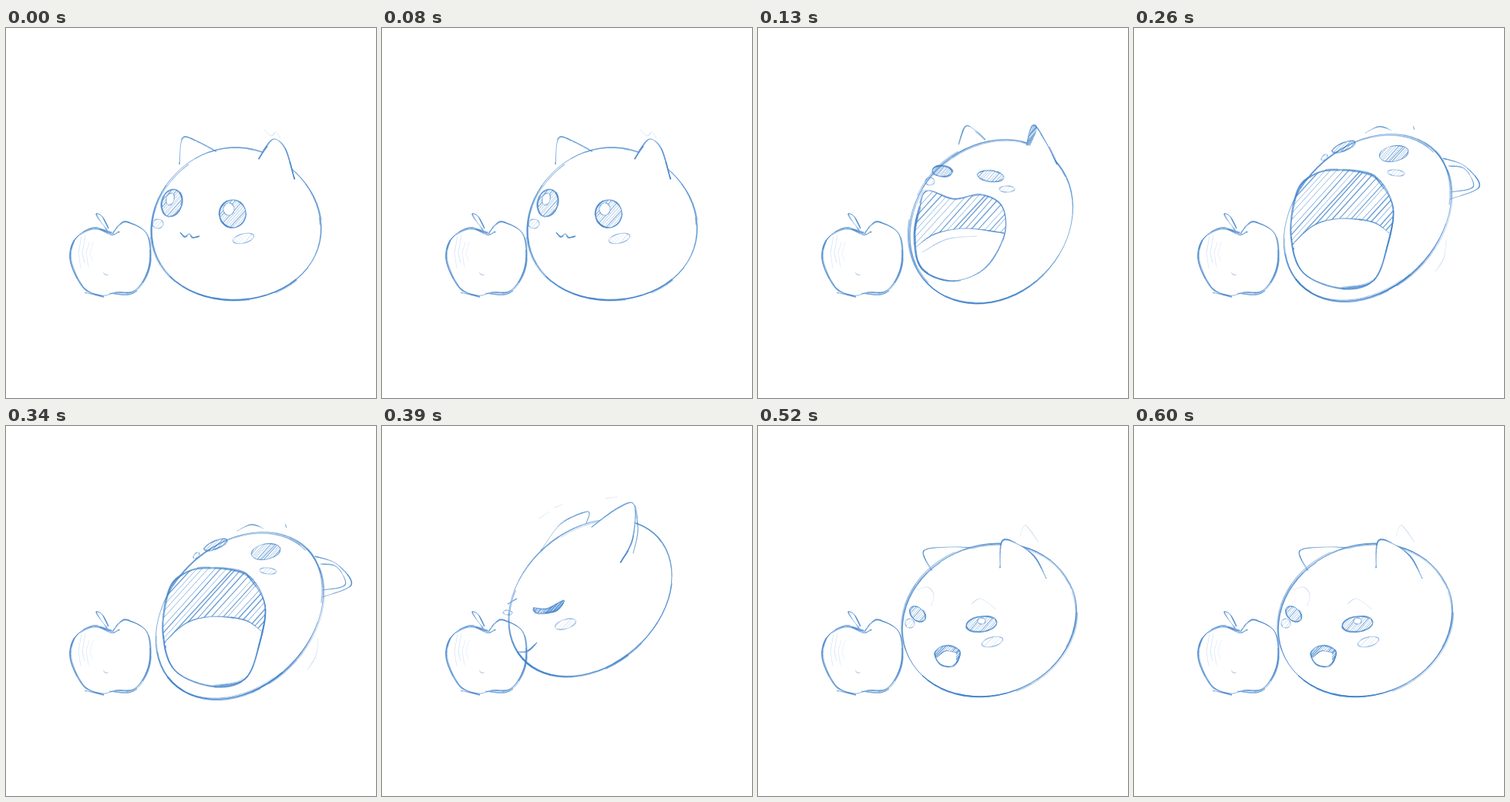
An HTML page with a canvas for the animation above (650 ms loop, 480x480 px).

```html
<!DOCTYPE html>
<html>
<head>
<meta charset="utf-8">
<style>
html, body { margin: 0; width: 100%; height: 100%; overflow: hidden; background: #fff }
canvas { display: block }
</style>
</head>
<body>
<canvas id="stage" width="480" height="480"></canvas>
<script>
const ctx = document.getElementById('stage').getContext('2d');
const STEP = 130;
let seed;
const random = () => (seed = seed * 16807 % 2147483647) / 2147483647;
const spread = r => (random() * 2 - 1) * r;

// Smooth curve through "x,y x,y ..."; a trailing z closes it.
function line(text) {
  const closed = text.endsWith('z');
  const keys = text.replace('z', '').split(' ').map(p => p.split(',').map(Number));
  const n = keys.length, last = closed ? n : n - 1, pts = [];
  const at = i => keys[closed ? (i + n) % n : Math.max(0, Math.min(n - 1, i))];
  for (let i = 0; i < last; i++) {
    const [a, b, c, d] = [i - 1, i, i + 1, i + 2].map(at);
    for (let t = 0; t < 1; t += .125)
      pts.push([0, 1].map(k => b[k] + .5 * t * (c[k] - a[k] +
        t * (2 * a[k] - 5 * b[k] + 4 * c[k] - d[k] + t * (3 * (b[k] - c[k]) + d[k] - a[k])))));
  }
  return [...pts, at(last)];
}

// Tilted oval; taper widens its lower half.
function egg(cx, cy, rx, ry, tilt = 0, taper = 0) {
  const cos = Math.cos(tilt), sin = Math.sin(tilt);
  return Array.from({ length: 65 }, (_, i) => {
    const a = i * Math.PI / 32, y = ry * Math.sin(a);
    const x = rx * Math.cos(a) * (1 + taper * Math.sin(a));
    return [cx + x * cos - y * sin, cy + x * sin + y * cos];
  });
}

// One line whose pressure varies along its length.
function pencil(pts, width, alpha) {
  const phase = random() * 6;
  ctx.globalAlpha = alpha;
  for (let i = 1; i < pts.length; i++) {
    ctx.lineWidth = width * (.85 + .3 * Math.sin(i * .4 + phase));
    ctx.beginPath();
    ctx.moveTo(...pts[i - 1]);
    ctx.lineTo(...pts[i]);
    ctx.stroke();
  }
}

// A main line with short, loose strands laid over it.
function sketch(pts, width = 1.5, loose = .9) {
  pencil(pts, width, .75);
  for (let n = pts.length / 6; n > 0; n--) {
    const count = 5 + random() * pts.length * .25;
    const start = Math.floor(random() * (pts.length + count) - count);
    const dx = spread(loose), dy = spread(loose);
    pencil(pts.slice(Math.max(0, start), Math.max(0, start + count)).map(([x, y]) => [x + dx, y + dy]), width * .75, .5);
  }
}

const faint = text => pencil(line(text), 1, .25);

function trace(pts) {
  ctx.beginPath();
  pts.forEach(p => ctx.lineTo(...p));
}

function erase(pts) {
  ctx.globalAlpha = 1;
  trace(pts);
  ctx.fill();
}

function hatch(pts, gap, width = 1.3, alpha = .75) {
  const xs = pts.map(p => p[0]), ys = pts.map(p => p[1]);
  const top = Math.min(...ys), bottom = Math.max(...ys), run = (bottom - top) * .9;
  ctx.save();
  trace(pts);
  ctx.clip();
  for (let x = Math.min(...xs); x < Math.max(...xs) + run; x += gap)
    pencil([[x + spread(gap / 4), top], [x - run + spread(gap / 4), bottom]], width, alpha);
  ctx.restore();
}

function body(...shape) {
  const pts = egg(...shape);
  const low = pts.reduce((best, p, i) => p[1] > pts[best][1] ? i : best, 0);
  sketch(pts, 1.5, 1.8);
  sketch(pts.slice(Math.max(0, low - 8), low + 9), 1.7, 1.2);
}

function eye(shape, gap = 3, width = 1.5) {
  const pts = egg(...shape);
  hatch(pts, gap, 1.1, .6);
  sketch(pts, width);
}

function shine(...shape) {
  const pts = egg(...shape);
  erase(pts);
  pencil(pts, 1.1, .8);
}

function cheek(...shape) {
  const pts = egg(...shape);
  hatch(pts, 5, .8, .3);
  pencil(pts, 1.1, .65);
}

function mouth(outline, tongue, gap) {
  const rim = line(outline), edge = line(tongue);
  const bottom = Math.max(...rim.map(p => p[1]));
  hatch(rim, gap);
  erase([...edge, [edge.at(-1)[0], bottom], [edge[0][0], bottom]]);
  sketch(edge, 1.2, .6);
  sketch(rim, 1.6, 1.2);
}

function frontEar(text) {
  const pts = line(text);
  erase(pts);
  sketch(pts, 1.6);
}

function apple() {
  sketch(line('137,266 112,260 89,275 84,303 101,337 124,347 143,343 168,340 186,308 183,268 158,252 147,256 138,267'), 1.4, 1.3);
  sketch(line('122,261 137,268 147,264'));
  sketch(line('133,260 125,245 117,241 122,250 131,262'), 1.3, .4);
  sketch(line('102,343 127,349'), 1.3);
  sketch(line('134,344 158,346 170,341'), 1.3);
  pencil(line('126,317 129,320 133,320'), 1, .5);
  for (let x = 94; x < 114; x += 5) pencil([[x + 4, 272 + spread(6)], [x, 292], [x + 3, 308 + spread(8)]], 1, .2);
}

function sitting() {
  body(298, 254, 110, 99, -.06, .08);
  sketch(line('225,177 229,143 248,147 273,160'), 1.3);
  frontEar('328,170 338,153 349,144 363,158 374,196');
  sketch(line('328,170 339,153'), 1.8);
  eye([215, 227, 13, 18, .25], 3.5, 1.7);
  eye([294, 241, 17, 18], 3.5, 1.7);
  shine(213, 222, 5, 8, .3);
  shine(289, 235, 7, 8);
  sketch(line('226,265 232,271 238,267 242,272 251,270'), 1.9, .5);
  cheek(308, 273, 14, 6, -.25);
  cheek(197, 254, 7, 6);
  faint('335,132 344,140 350,135 356,143');
}

function opening() {
  mouth('220,211 254,222 290,216 317,232 319,270 294,312 252,328 212,312 203,270 210,232z', '205,284 230,267 270,260 319,266', 8);
  pencil(line('213,291 245,274 284,270'), .9, .5);
  body(302, 251, 115, 97, -.78);
  sketch(line('260,151 269,128 281,132 295,145'), 1.2);
  frontEar('348,152 357,126 373,147 388,177');
  hatch(line('348,152 357,126 362,131 353,153'), 2);
  eye([239, 186, 13, 7, .1], 2.2, 1.7);
  eye([302, 192, 17, 7, .1], 4, 1.1);
  cheek(323, 209, 10, 4);
  cheek(223, 199, 6, 5);
}

function widest() {
  mouth('265,184 313,193 336,232 328,285 310,328 270,338 220,318 204,270 212,212 235,189z', '208,278 235,255 270,247 310,252 331,266', 7.5);
  sketch(line('313,193 336,232 328,285 310,328 270,338'), 1.6, 1.5);
  body(303, 246, 123, 92, -.78);
  sketch(line('401,169 429,179 448,206 410,222'), 1.3);
  sketch(line('408,179 429,183 440,206 411,213'), 1.1);
  sketch(line('300,136 318,128 334,133'), 1);
  eye([337, 163, 19, 10, -.2], 3.2, 1);
  eye([272, 154, 16, 5, -.4], 4, 1.2);
  cheek(340, 188, 11, 4, .1);
  cheek(247, 168, 5, 3, -.8);
  pencil(line('362,127 364,132'), 1, .7);
  faint('405,275 402,298 391,316');
}

function biting() {
  body(270, 223, 118, 88, -.72);
  sketch(line('206,162 232,127 267,111 265,126'), 1);
  frontEar('272,131 305,107 327,102 325,147 309,177');
  sketch(line('328,102 332,135 326,165'), 1);
  const lid = line('197,236 214,237 236,226 226,240 203,243z');
  hatch(lid, 1.8);
  sketch(lid);
  cheek(238, 257, 14, 6, -.3);
  cheek(163, 242, 6, 3, .1);
  sketch(line('163,231 175,224'), 1.4);
  sketch(line('176,293 189,292 201,281'), 1.9);
  faint('204,120 217,111');
  faint('224,106 235,101');
  faint('290,94 305,92');
}

function chewing() {
  mouth('229,296 236,287 250,285 262,292 258,306 249,312 236,309z', '232,300 243,292 257,294', 3);
  body(300, 252, 115, 97, -.35);
  sketch(line('225,187 215,162 250,157 276,158'), 1.2);
  frontEar('314,184 317,149 340,155 360,171 374,198');
  eye([207, 244, 12, 8, .8]);
  eye([290, 257, 20, 10, -.15], 3, 1.7);
  shine(290, 253, 5, 4);
  cheek(304, 280, 14, 6, -.25);
  cheek(197, 256, 6, 6);
  faint('206,213 220,209 228,219 225,233');
  faint('277,231 289,224 308,237');
  faint('340,143 347,129 364,151');
}

const poses = [sitting, opening, widest, biting, chewing];
let shown = -1;

function draw(index) {
  seed = 7;
  ctx.globalAlpha = 1;
  ctx.fillStyle = '#fff';
  ctx.fillRect(0, 0, 480, 480);
  ctx.strokeStyle = '#3f82ca';
  apple();
  poses[index]();
}

const start = performance.now();
function tick() {
  const index = Math.floor((performance.now() - start) / STEP) % poses.length;
  if (index !== shown) draw(shown = index);
  requestAnimationFrame(tick);
}
tick();
</script>
</body>
</html>
```
